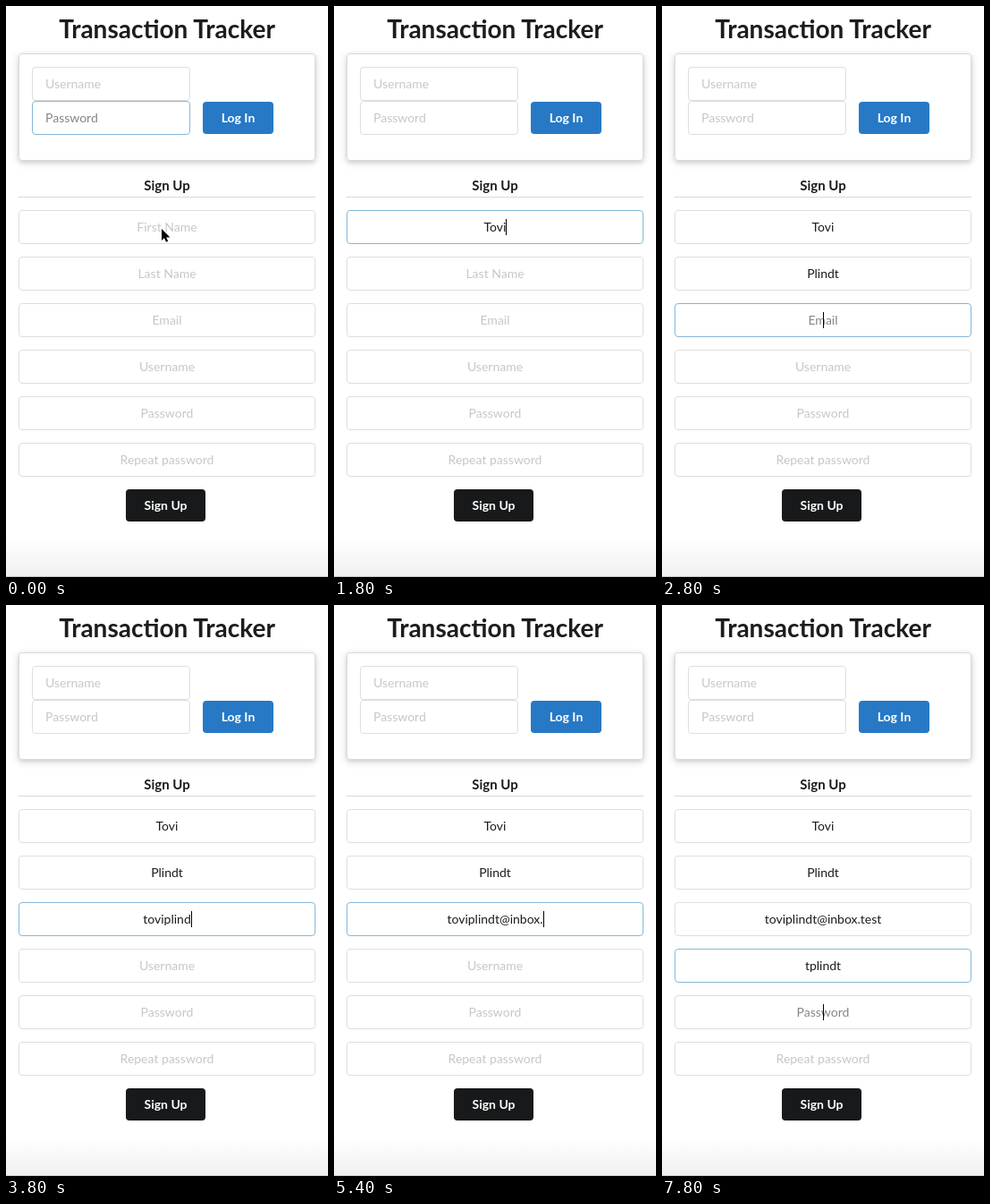
Write an HTML page that moves like this. It is 360x638 px and loops after 8 s.

```html
<!DOCTYPE html>
<html lang="en">
<head>
<meta charset="utf-8">
<title>Transaction Tracker</title>
<style>
html, body { margin: 0; width: 100%; height: 100%; overflow: hidden; background: #fff; }
#stage { position: relative; width: 360px; height: 638px; overflow: hidden; background: #fff;
  font: 14px/36px Lato, sans-serif; color: #1b1c1d; }
#stage > * { position: absolute; box-sizing: border-box; }
h1 { left: 0; top: 7px; width: 360px; margin: 0; font-size: 28px; line-height: 36px; text-align: center; }
h4 { left: 14px; top: 191px; width: 332px; height: 23px; margin: 0; font-size: 15px; line-height: 18px;
  text-align: center; border-bottom: 1px solid #d8d8d9; }
.card { left: 14px; top: 53px; width: 332px; height: 120px; border: 1px solid #d9d9da; border-radius: 4px;
  box-shadow: 0 2px 4px rgba(34,36,38,.12), 0 2px 10px rgba(34,36,38,.15); }
.field { left: 14px; width: 332px; height: 38px; border: 1px solid #dedede; border-radius: 4px;
  background: #fff; text-align: center; }
.login { left: 29px; width: 177px; padding-left: 14px; text-align: left; }
.field span { position: relative; display: inline-block; white-space: pre; }
.caret { position: absolute; top: 9px; width: 1px; height: 18px; background: #000; }
.button { height: 36px; border-radius: 4px; color: #fff; font-weight: 700; text-align: center; }
#popup { left: 14px; top: 318px; width: 332px; height: 130px; padding-top: 9px; background: #fff;
  border-radius: 0 0 3px 3px; box-shadow: 0 1px 4px rgba(0,0,0,.4);
  font: 13px/36px Roboto, sans-serif; letter-spacing: .35px; color: #56585c; }
#popup div { display: flex; justify-content: space-between; padding: 0 12px; }
#popup b { font-weight: 500; color: #151515; }
#popup .manage { position: absolute; left: 0; right: 0; bottom: 0; height: 41px; box-sizing: border-box;
  line-height: 41px; border-top: 1px solid #e0e0e2; background: #f6f6f8; border-radius: 0 0 3px 3px; }
.shade { left: 0; top: 596px; width: 360px; height: 42px; border-bottom: 1px solid #cfcfcf;
  background: linear-gradient(#fff, #f0f0f0); }
svg { left: 0; top: 0; width: 360px; height: 638px; }
</style>
</head>
<body onload="
const LOOP = 8000, FADE = 100;
const byId = id => document.getElementById(id);
const stage = byId('stage'), popup = byId('popup'), arrow = byId('arrow'), move = byId('move');

// keys: bursts of typing as [start, interval, count]
const fields = [
  { top: 68, label: 'Username', login: true },
  { top: 106, label: 'Password', login: true, focus: -600, blur: 520 },
  { top: 228, label: 'First Name', text: 'Tovi', focus: 520, blur: 1850, keys: [[1300, 120, 4]] },
  { top: 280, label: 'Last Name', text: 'Plindt', focus: 1850, blur: 2700, keys: [[2300, 65, 6]] },
  { top: 332, label: 'Email', text: 'toviplindt@inbox.test', focus: 2700, blur: 5900,
    keys: [[3000, 100, 11], [4950, 80, 10]] },
  { top: 384, label: 'Username', text: 'tplindt', focus: 5900, blur: 7790,
    keys: [[6150, 250, 2], [6700, 110, 5]] },
  { top: 436, label: 'Password', focus: 7790, blur: LOOP },
  { top: 488, label: 'Repeat password' }
];

for (const field of fields) {
  field.box = document.createElement('div');
  field.box.className = field.login ? 'field login' : 'field';
  field.box.style.top = field.top + 'px';
  field.span = document.createElement('span');
  field.content = document.createTextNode(field.label);
  field.caret = document.createElement('i');
  field.caret.className = 'caret';
  field.span.append(field.content, field.caret);
  field.box.append(field.span);
  stage.insertBefore(field.box, popup);
  field.strokes = (field.keys || []).flatMap(([first, gap, count]) =>
    Array.from({ length: count }, (_, i) => first + i * gap));
}

const ease = x => {
  x = Math.min(1, Math.max(0, x));
  return x * x * (3 - 2 * x);
};
const mix = (from, to, k) => `rgb(${from.map((v, i) => Math.round(v + (to[i] - v) * k))})`;
const show = (node, visible) => { node.style.visibility = visible ? 'visible' : 'hidden'; };

function drawField(field, t) {
  const { focus = Infinity, blur = Infinity, strokes, box, span, caret } = field;
  const focused = t >= focus && t < blur;
  const typed = strokes.filter(time => time <= t);
  const shown = typed.length ? field.text.slice(0, typed.length) : field.label;
  if (field.content.data !== shown) field.content.data = shown;
  span.style.color = typed.length ? '#1b1c1d' : focused ? '#858585' : '#c7c7c7';
  const glow = ease((t - focus) / FADE) - ease((t - blur) / FADE);
  box.style.borderColor = mix([222, 222, 222], [133, 183, 217], glow);
  const lastEvent = typed.length ? typed[typed.length - 1] : focus;
  show(caret, focused && (t - lastEvent) % 1000 < 500 && !field.login);
  caret.style.left = typed.length ? '100%' : '50%';
}

function draw(now) {
  const t = now % LOOP;
  fields.forEach(field => drawField(field, t));
  show(popup, t >= 1880 && t < 2300);
  show(arrow, t < 520);
  show(move, t >= 520 && t < 1300);
}

let start;
function tick(now) {
  start ??= now;
  draw(now - start);
  requestAnimationFrame(tick);
}
draw(0);
requestAnimationFrame(tick);
">
<div id="stage">
  <h1>Transaction Tracker</h1>
  <div class="card"></div>
  <div class="button" style="left:220px;top:107px;width:79px;background:#2779c5">Log In</div>
  <h4>Sign Up</h4>
  <div class="button" style="left:134px;top:540px;width:89px;background:#18191a">Sign Up</div>
  <div class="shade"></div>
  <div id="popup">
    <div><b>Bandulgez</b>Harvin Bandulgez</div>
    <div><b>Tolvadez</b>Harvin Bandulgez Tolvadez</div>
    <div class="manage">Manage...</div>
  </div>
  <svg stroke="#fff" stroke-linejoin="round" paint-order="stroke">
    <path id="arrow" stroke-width="2" d="M174 249v13l3-2.8 2 4.6 2.2-1-2-4.4h4.2z"/>
    <path id="move" stroke-width="2" d="M174 241.5l3 3.5h-2v3h3v-2l3.5 3-3.5 3v-2h-3v3h2l-3 3.5-3-3.5h2v-3h-3v2l-3.5-3 3.5-3v2h3v-3h-2z"/>
  </svg>
</div>
</body>
</html>
```
